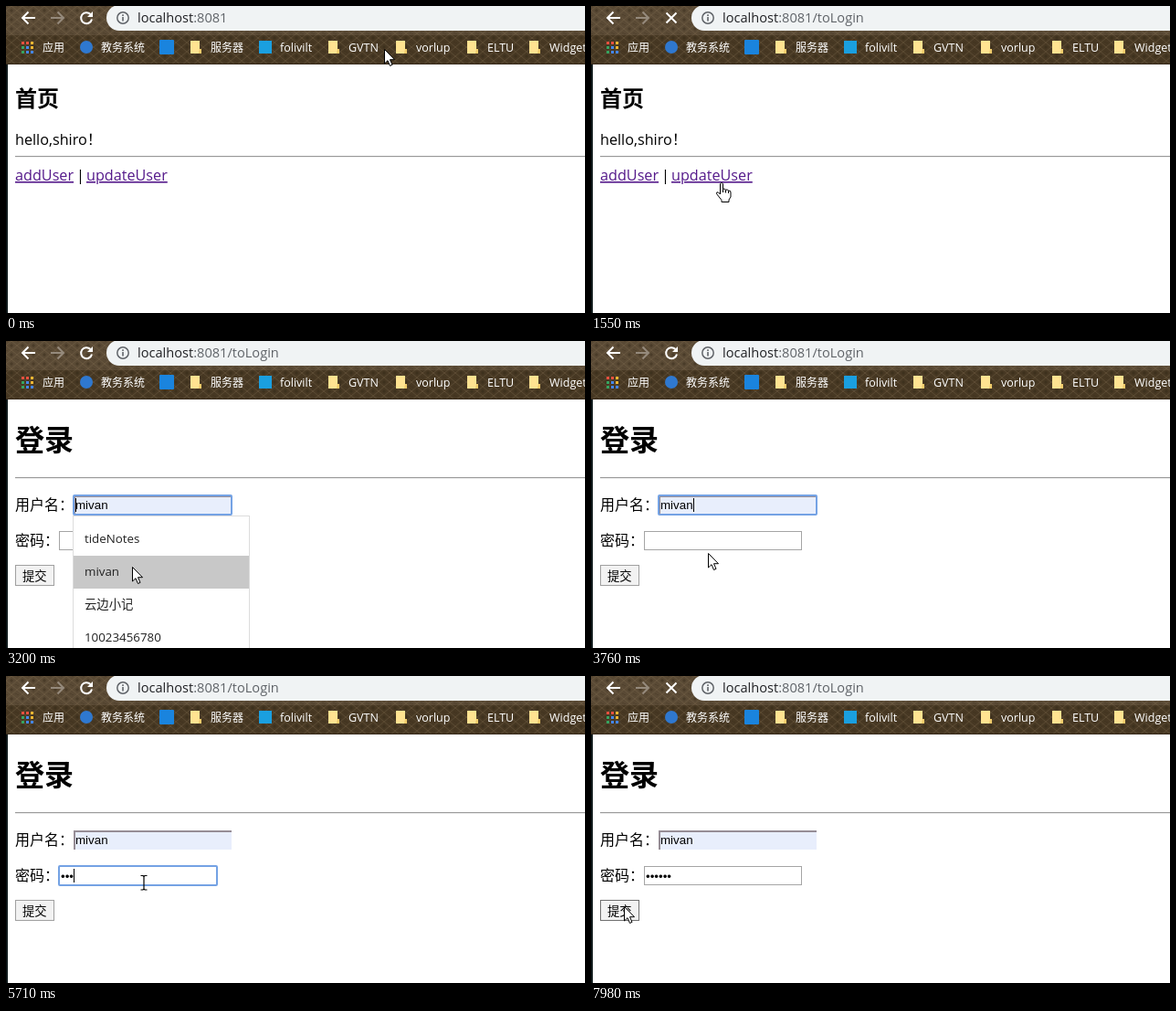
These frames come from a looping animation (634x336 px, 8 s). An HTML page:

```html
<!DOCTYPE html>
<html lang="zh-CN">
<head>
<meta charset="utf-8">
<title>登录</title>
<style>
html, body { margin: 0; width: 100%; height: 100%; overflow: hidden; background: #fff; }
svg { display: block; width: 634px; height: 336px; }
text { font: 16px "Open Sans", "Noto Sans CJK SC", "Noto Sans CJK", "Noto Sans", sans-serif; white-space: pre; }
.bar text { font-size: 12.5px; font-weight: 500; fill: #fff; }
.bar .zh { font-size: 12px; }
.url text { font-size: 14.6px; fill: #5f6368; }
.h1 { font-size: 32px; font-weight: 700; }
.h2 { font-size: 24px; font-weight: 700; }
.body { font-size: 16.2px; }
.link { fill: #551a8b; text-decoration: underline; }
.small, #list text { font-size: 13.33px; }
.value { font: 13.33px "Liberation Sans", Arial, sans-serif; }
.stroke { fill: none; stroke: #fff; stroke-width: 2; }
.ring { fill: none; stroke: #74a2e4; stroke-width: 2; }
.caret { stroke: #000; shape-rendering: crispEdges; }
</style>
</head>
<body>
<svg viewBox="0 0 634 336">
  <defs>
    <pattern id="weave" width="12" height="10" patternUnits="userSpaceOnUse">
      <path d="M0 5L6 0L12 5L6 10Z" fill="none" stroke="#8a7758" stroke-opacity=".3"/>
      <path d="M4 5h4M6 3v4M0 0h2M10 10h2" stroke="#2c2012" stroke-opacity=".4"/>
    </pattern>
    <g id="folder">
      <path d="M0 0H10V10H12V14H0Z" fill="#ffe391"/>
      <path d="M10 9H12V14H9Z" fill="#f0cb6a"/>
    </g>
  </defs>
  <rect width="634" height="336" fill="#fff"/>

  <g class="bar">
    <rect width="634" height="32" fill="#5a4a35"/>
    <rect y="32" width="634" height="32" fill="#473823"/>
    <rect width="634" height="64" fill="url(#weave)"/>
    <path d="M0 63.5H634" stroke="#36291a"/>
    <path class="stroke" d="M32 13H18M24.500 6.500L18 13L24.500 19.500"/>
    <path class="stroke" d="M49 13H63M56.500 6.500L63 13L56.500 19.500" style="stroke:#958a7c"/>
    <g id="reload">
      <path class="stroke" d="M92.500 9A6 6 0 1 0 94 14.500"/>
      <path d="M95 6V12H89Z" fill="#fff"/>
    </g>
    <path id="stop" class="stroke" d="M82.500 7.500L93.500 18.500M93.500 7.500L82.500 18.500"/>
    <g id="apps"></g>
    <text class="zh" x="40" y="50">应用</text>
    <circle cx="88" cy="45" r="7" fill="#2f78cf"/>
    <text class="zh" x="104" y="50">教务系统</text>
    <rect x="168" y="37" width="16" height="16" rx="1" fill="#1a84de"/>
    <use href="#folder" x="202" y="38"/><text class="zh" x="224" y="50">服务器</text>
    <rect x="277" y="38" width="14" height="14" fill="#1a9fe0"/><text x="300" y="50">folivilt</text>
    <use href="#folder" x="353" y="38"/><text x="375" y="50">GVTN</text>
    <use href="#folder" x="427" y="38"/><text x="449" y="50">vorlup</text>
    <use href="#folder" x="505" y="38"/><text x="527" y="50">ELTU</text>
    <use href="#folder" x="573" y="38"/><text x="595" y="50">Widgets</text>
  </g>
  <g class="url">
    <rect x="110" y="-1" width="560" height="28" rx="14" fill="#f0f3f4"/>
    <circle cx="128" cy="13" r="6.200" fill="none" stroke="#5f6368" stroke-width="1.500"/>
    <path d="M128 9.200V11M128 12V16.500" stroke="#5f6368" stroke-width="1.600"/>
    <text x="144" y="18"><tspan fill="#202124">localhost</tspan>:8081<tspan id="path">/toLogin</tspan></text>
  </g>
  <rect y="64" width="2" height="272" fill="#101a1c"/>

  <g id="home">
    <text class="h2" x="10" y="110">首页</text>
    <text class="body" x="10" y="152">hello,shiro！</text>
    <path d="M10 164.500H634" stroke="#999"/><path d="M10 165.500H634" stroke="#eee"/>
    <text class="body link" x="10" y="191">addUser</text>
    <text class="body" x="77" y="191">|</text>
    <text id="update" class="body link" x="88" y="191">updateUser</text>
  </g>

  <g id="login">
    <text class="h1" x="10" y="120">登录</text>
    <path d="M10 149.500H634" stroke="#999"/><path d="M10 150.500H634" stroke="#eee"/>
    <text x="10" y="185">用户名：</text>
    <text x="10" y="224">密码：</text>
    <rect x="74.500" y="169.500" width="172" height="20" fill="#fff" stroke="#a5a5a5"/>
    <g id="filled">
      <rect x="74" y="169" width="173" height="21" fill="#e8eefc"/>
      <path d="M75 190V170H247" fill="none" stroke="#968d96" stroke-width="2"/>
    </g>
    <text id="user" class="value" x="76" y="184"></text>
    <rect id="ring1" class="ring" x="74" y="169" width="173" height="21" rx="1"/>
    <path id="caret1" class="caret"/>
    <rect x="58.500" y="208.500" width="172" height="20" fill="#fff" stroke="#a5a5a5"/>
    <text id="pass" class="value" x="60" y="223.500"></text>
    <rect id="ring2" class="ring" x="58" y="208" width="173" height="21" rx="1"/>
    <path id="caret2" class="caret"/>
    <rect id="button" x="10.500" y="245.500" width="42" height="22"/>
    <text class="small" x="18" y="262">提交</text>
    <g id="list">
      <rect x="73.500" y="191.500" width="193" height="160" fill="#fff" stroke="#dcdcdc"/>
      <rect id="hover" x="74" width="192" height="36" fill="#c8c8c8"/>
    </g>
  </g>

  <g id="cursor">
    <path id="arrow" d="M.5 .5V16L4 12.700L6.500 18.500L9 17.400L6.500 11.700H11.500Z" fill="#fff" stroke="#000"/>
    <path id="beam" d="M-3.500 -7.500H-1L0 -6.500L1 -7.500H3.500M0 -6.500V7M-3.500 8H-1L0 7L1 8H3.500" fill="none" stroke="#000" stroke-width="1.200"/>
    <g id="hand" fill="#fff" stroke="#000">
      <path d="M-1.500 13V1.500Q0 -.8 1.500 1.500V7.500Q3.500 6 4.500 8.300Q6.700 7 7.500 9.200Q10 8.500 10 11V16L8 19V21.500H0V19.500L-5.500 12.500Q-5.800 10 -3.500 11Z"/>
      <path d="M1.500 7.500V11M4.500 8.300V11.500M7.500 9.200V12"/>
    </g>
  </g>
</svg>
<script>
const LOOP = 8000, FILL = 3590;
const names = ['tideNotes', 'mivan', '云边小记', '10023456780'];
const keyTimes = [5250, 5470, 5710, 5940, 6210, 6410];
// time, x, y of the pointer's hot spot
const track = [
  [70, 414, 47], [240, 426, 90], [400, 390, 98], [720, 194, 178],
  [860, 144, 194], [940, 143, 193], [1800, 143, 193],
  [2650, 167, 177], [2980, 167, 177], [3200, 138, 247], [3290, 138, 243],
  [3400, 138, 243], [3440, 126, 239], [3590, 126, 239], [3760, 128, 232],
  [3850, 128, 232], [4150, 150, 222], [4300, 151, 228], [4460, 151, 226],
  [7040, 151, 226], [7430, 22, 267], [7500, 22, 267], [7660, 36, 252]
];
const $ = id => document.getElementById(id);
const show = (id, on) => $(id).style.display = on ? '' : 'none';
const within = (v, a, b) => v >= a && v < b;

function add(parent, tag, attrs, text = '') {
  const el = document.createElementNS('http://www.w3.org/2000/svg', tag);
  for (const k in attrs) el.setAttribute(k, attrs[k]);
  el.textContent = text;
  $(parent).append(el);
}

['#e8503f', '#e8503f', '#f2b632', '#36a460', '#4486ec', '#f2b632', '#36a460', '#4486ec', '#4486ec']
  .forEach((fill, i) => add('apps', 'rect', {
    x: 17 + i % 3 * 5, y: 39 + Math.floor(i / 3) * 5, width: 3, height: 3, fill
  }));
names.forEach((name, i) => add('list', 'text', { x: 86, y: 221 + i * 36, fill: '#222' }, name));

function pointer(t) {
  const i = track.findIndex(k => k[0] > t);
  if (i === 0) return track[0].slice(1);
  if (i < 0) return track[track.length - 1].slice(1);
  const [a, b] = [track[i - 1], track[i]];
  const p = (t - a[0]) / (b[0] - a[0]);
  return [1, 2].map(n => Math.round(a[n] + (b[n] - a[n]) * p));
}

function caret(id, on, x, y) {
  show(id, on);
  $(id).setAttribute('d', `M${x + .5} ${y}v15`);
}

function draw(t) {
  const [x, y] = pointer(t);
  const home = t < 1870, open = within(t, 2815, FILL);
  const busy = within(t, 1250, 1870) || t >= 7900;
  show('home', home);
  show('login', !home);
  show('reload', !busy);
  show('stop', busy);
  show('path', t >= 1550);
  $('update').style.fill = within(t, 1090, 1250) ? '#e00000' : '';

  const row = open && y >= 199 ? Math.floor((y - 199) / 36) : -1;
  const user = t >= FILL ? names[1] : names[row] || '';
  show('list', open);
  show('hover', row >= 0);
  $('hover').setAttribute('y', 199 + row * 36);
  $('user').textContent = user;
  show('filled', user);
  show('ring1', within(t, 2740, 4150));
  caret('caret1', within(t, 2740, 4150), t < FILL ? 76 : 112, 172);

  const typed = keyTimes.filter(k => k <= t).length;
  $('pass').textContent = '•'.repeat(typed);
  show('ring2', within(t, 4300, 7810));
  const lit = within(t, 4300, 4920) || within(t, 5250, 6880) || within(t, 7350, 7810);
  caret('caret2', lit, 60 + Math.round(typed * 4.67), 211);
  $('button').setAttribute('stroke', t >= 7810 ? '#707070' : '#a0a0a0');
  $('button').setAttribute('fill', within(t, 7810, 7900) ? '#d8d8d8' : '#f2f2f2');

  const hand = home && within(x, 88, 177) && within(y, 174, 197);
  const beam = !home && (within(x, 74, 247) && within(y, 169, 190) ||
    !open && within(x, 58, 231) && within(y, 208, 229));
  show('hand', hand);
  show('beam', beam);
  show('arrow', !hand && !beam);
  $('cursor').setAttribute('transform', `translate(${x} ${y})`);
}

function frame() {
  draw(performance.now() % LOOP);
  requestAnimationFrame(frame);
}
frame();
</script>
</body>
</html>
```
